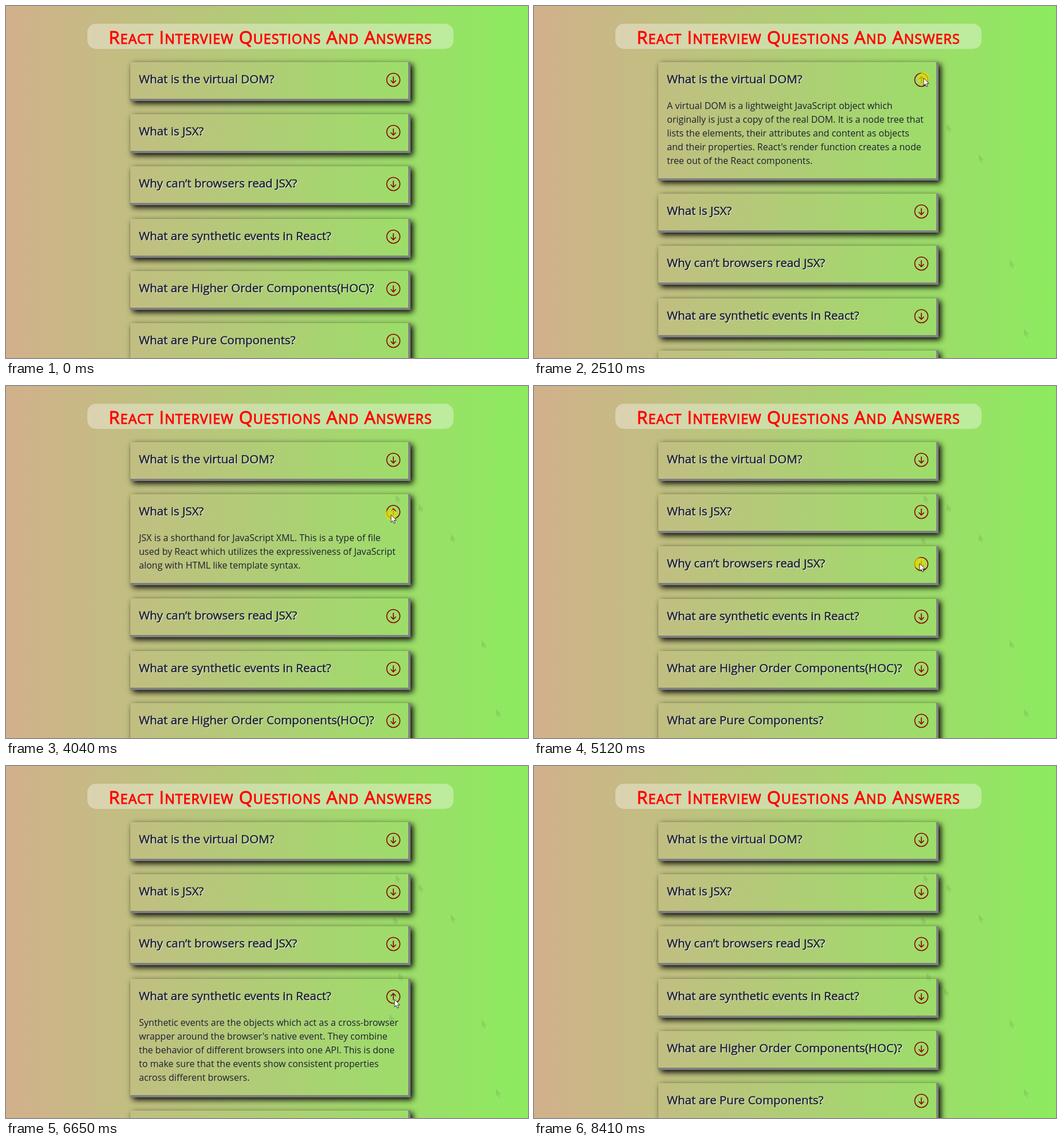
Write an HTML page that moves like this. It is 911 by 615 pixels and loops after 9.73 s.

```html
<!DOCTYPE html>
<html lang="en">
<head>
<meta charset="utf-8">
<title>Interview questions</title>
<style>
  html, body { margin: 0; width: 100%; height: 100%; overflow: hidden; }
  body {
    position: relative;
    background: linear-gradient(to right, #d2b08c, #8ceb5f);
    font-family: "Open Sans", "Noto Sans", sans-serif;
    color: #1c2033;
  }
  h1 {
    position: absolute; left: 142px; top: 31px; width: 639px; height: 44px;
    margin: 0; border-radius: 15px; background: rgba(255, 255, 255, .35);
    color: red; font-size: 31px; font-weight: 400; line-height: 47px;
    letter-spacing: 1px; text-align: center; text-transform: uppercase;
    white-space: nowrap; -webkit-text-stroke: .9px red;
  }
  h1 small { font-size: .75em; }
  main { position: absolute; left: 217px; top: 98px; width: 489px; }
  section {
    box-sizing: border-box; position: relative; min-height: 68px;
    margin-bottom: 23.2px; padding: 0 15px;
    border: solid gray; border-width: 0 4px 4px 0;
    box-shadow: 4px 4px 10px #000;
  }
  h2 {
    margin: 0; height: 64px; font-size: 20.5px; font-weight: 400; line-height: 59px;
    white-space: nowrap; text-shadow: 1px 1px 1px #fff; -webkit-text-stroke: .5px;
  }
  p { display: none; margin: 0; padding-bottom: 19px; font-size: 16px; line-height: 24px; }
  .open p { display: block; }
  .icon { position: absolute; left: 445.5px; top: 18px; width: 26px; height: 26px; }
  .open .icon { transform: rotate(180deg); }
  .icon path { fill: none; stroke: #8b0000; stroke-width: 1.6; }
  #overlay { position: absolute; left: 0; top: 0; width: 911px; height: 615px; }
</style>
</head>
<body>
<h1>R<small>eact</small> I<small>nterview</small> Q<small>uestions</small> A<small>nd</small> A<small>nswers</small></h1>
<main></main>
<svg id="overlay" viewBox="0 0 911 615">
  <defs><path id="arrow" d="M0 0V13L3 10.3 5 15 7.2 14 5.2 9.5H9.3Z"/></defs>
  <g id="trail" fill="#4b5f41" fill-opacity=".14"></g>
  <g id="pointer">
    <circle id="click" r="10" fill="#e4dc00" opacity=".72"/>
    <use href="#arrow" fill="#fff" stroke="#222" stroke-width=".9"/>
  </g>
</svg>
<script>
const LOOP = 9730, CLICK = 150;
const $ = selector => document.querySelector(selector);

const items = [
  { question: "What is the virtual DOM?", open: 1770, close: 2630,
    answer: "A virtual DOM is a lightweight JavaScript object which originally is just a copy of the real DOM. It is a node tree that lists the elements, their attributes and content as objects and their properties. React's render function creates a node tree out of the React components." },
  { question: "What is JSX?", open: 3510, close: 4190,
    answer: "JSX is a shorthand for JavaScript XML. This is a type of file used by React which utilizes the expressiveness of JavaScript along with HTML like template syntax." },
  { question: "Why can’t browsers read JSX?", open: 5270, close: 5850,
    answer: "Browsers can only read JavaScript objects but JSX is not a regular JavaScript object. Thus to enable a browser to read JSX, first, we need to transform the JSX file into a JavaScript object using JSX transformers like Babel and then pass it to the browser." },
  { question: "What are synthetic events in React?", open: 6650, close: 7200,
    answer: "Synthetic events are the objects which act as a cross-browser wrapper around the browser's native event. They combine the behavior of different browsers into one API. This is done to make sure that the events show consistent properties across different browsers." },
  { question: "What are Higher Order Components(HOC)?", answer: "" },
  { question: "What are Pure Components?", answer: "" }
];

const icon = `<svg class="icon" viewBox="-13 -13 26 26">
  <path d="M-11.5 0a11.5 11.5 0 1 0 23 0a11.5 11.5 0 1 0-23 0M0-5.8V5.2M-4.5 1L0 5.5 4.5 1"/></svg>`;
$("main").innerHTML = items.map(({ question, answer }) =>
  `<section><h2>${question}</h2>${icon}<p>${answer}</p></section>`).join("");
const cards = document.querySelectorAll("section");

// Each move starts where the last one ended and passes its points at even intervals.
const moves = [
  { start: 260, end: 1220, points: [[878, 604], [855, 564], [830, 444], [776, 259], [720, 206], [680, 126]] },
  { start: 2830, end: 3380, points: [[680, 190], [672, 225]] },
  { start: 4510, end: 5050, points: [[676, 262], [673, 310]] },
  { start: 5790, end: 6500, points: [[685, 361], [669, 433], [678, 408]] },
  { start: 7660, end: 8410, points: [[716, 388], [803, 612]] }
];
moves.forEach((move, i) => {
  if (i) move.points.unshift(moves[i - 1].points.at(-1));
  move.interval = (move.end - move.start) / (move.points.length - 1);
});
const appears = moves[0].start, leaves = moves.at(-1).end;

// The pointer leaves a faint mark at every point it passes through.
const marks = moves.flatMap(({ start, interval, points }) =>
  points.slice(1, -1).map(([x, y], i) => ({ x, y, time: start + (i + 1.3) * interval })));
$("#trail").innerHTML = marks.map(({ x, y }) => `<use href="#arrow" x="${x}" y="${y}"/>`).join("");
const trail = [...$("#trail").children];

const within = (t, start, end) => t >= start && t < end;
const show = (element, visible) => element.style.visibility = visible ? "visible" : "hidden";
const isClicking = t => items.some(({ open, close }) =>
  within(t, open - CLICK, open) || within(t, close - CLICK, close));

function tipAt(t) {
  const { start, interval, points } = moves.findLast(move => t >= move.start) || moves[0];
  const position = Math.max(0, Math.min((t - start) / interval, points.length - 1));
  const i = Math.min(Math.floor(position), points.length - 2);
  return points[i].map((from, axis) => from + (points[i + 1][axis] - from) * (position - i));
}

function render(now) {
  const t = now % LOOP;
  items.forEach(({ open, close }, i) => cards[i].classList.toggle("open", within(t, open, close)));
  marks.forEach(({ time }, i) => show(trail[i], t >= time));
  const visible = within(t, appears, leaves);
  show($("#pointer"), visible);
  show($("#click"), visible && isClicking(t));
  $("#pointer").setAttribute("transform", `translate(${tipAt(t)})`);
  requestAnimationFrame(render);
}
render(performance.now());
</script>
</body>
</html>
```
